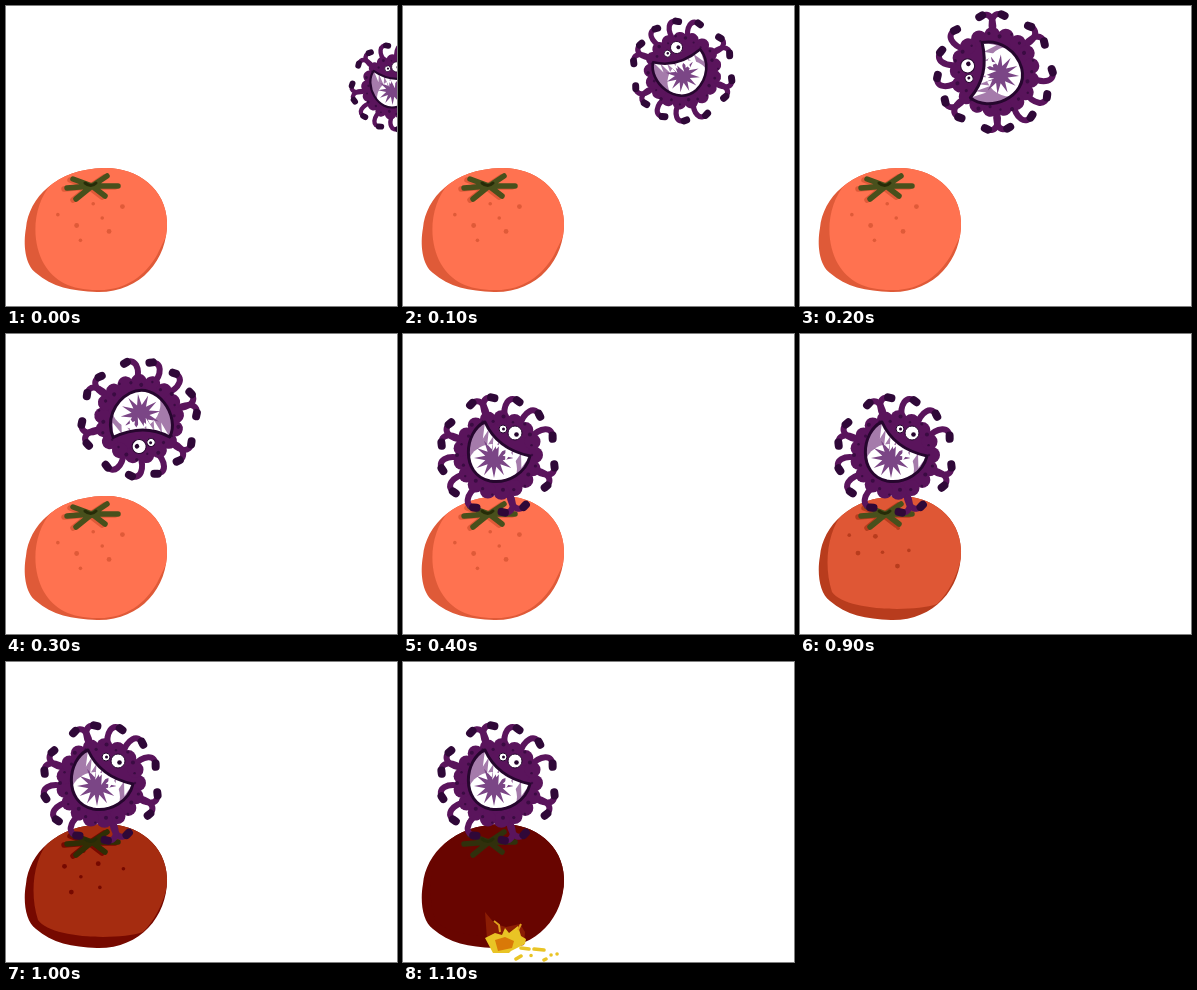
These frames come from a looping animation (391 by 300 pixels, 2.1 s). An HTML page:

```html
<!DOCTYPE html>
<html lang="en">
<head>
<meta charset="utf-8">
<title>Germ and tomato</title>
<style>
html, body { margin: 0; width: 100%; height: 100%; overflow: hidden; background: #fff; }
svg { display: block; width: 100vw; height: 100vh; }
#tomato { fill: var(--shade); stroke-linecap: round; }
#flesh { fill: var(--flesh); }
#stem { stroke: var(--stem); }
#stemShade { stroke: var(--shade); }
</style>
</head>
<body>
<svg viewBox="0 0 391 300">
  <defs>
    <path id="skin" d="M98 162C130 161 160 182 161 216C162 254 134 287 91 286C66 285 46 281 30 267C19 259 17 238 20 222C23 192 50 163 98 162Z"/>
    <path id="star" d="M61 182L86 180 67 173M101 170L86 180 112 180M99 190L86 180 70 193" fill="none" stroke-width="5.500"/>
    <path id="mouth" d="M-13-33C-34-24-38 20-8 26C10 29 28 18 32 1Q-1-6-13-33Z"/>
    <clipPath id="inSkin"><use href="#skin"/></clipPath>
    <clipPath id="inMouth"><use href="#mouth"/></clipPath>
  </defs>

  <g id="tomato">
    <use href="#skin"/>
    <path id="flesh" clip-path="url(#inSkin)"/>
    <use id="stemShade" href="#star" x="-3" y="1"/>
    <g id="pores"></g>
    <use id="stem" href="#star"/>
    <path d="M79 177Q85 182 90 177" fill="none" stroke="#262c08" stroke-width="3"/>
  </g>

  <g id="splat">
    <path d="M82 250L92 262 103 265 117 262 122 270 121 283 96 289 84 277Z" fill="#8b1d04"/>
    <path d="M82 276L92 271 99 273 102 266 106 271 115 264 118 274 123 277 122 282 108 289 106 291 90 291Z" fill="#e9c425"/>
    <path d="M92 278L102 275 111 279 109 286 95 289Z" fill="#d97908"/>
    <path d="M91 259L96 263 97 270M118 262L115 268" fill="none" stroke="#e0a01c" stroke-width="2"/>
    <path d="M118 286L126 287M131 287L141 288M113 297L118 294M128 293.500h.1M141 298L143 297M148 293h.1M154 292h.1" stroke="#e9c425" stroke-width="3.500" stroke-linecap="round"/>
  </g>

  <g id="germ">
    <g id="limbs" fill="none" stroke-linecap="round"></g>
    <g id="body" fill="#5a145c"><circle r="40"/></g>
    <g id="spots" fill="#3a0b42"></g>
    <g clip-path="url(#inMouth)">
      <use href="#mouth" fill="#a57bab"/>
      <circle cx="-6" cy="14" r="25" fill="#fff"/>
      <path id="throat" fill="#7b4686"/>
      <path id="teeth" fill="#fff"/>
    </g>
    <use href="#mouth" fill="none" stroke="#26062e" stroke-width="3" stroke-linejoin="round"/>
    <g fill="#fff" stroke="#26062e">
      <circle cx="5" cy="-26" r="4"/>
      <circle cx="17" cy="-22" r="7"/>
    </g>
    <g fill="#26062e">
      <circle cx="5.500" cy="-26" r="1.500"/>
      <circle cx="18.500" cy="-20.500" r="2.300"/>
    </g>
  </g>
</svg>
<script>
const $ = id => document.getElementById(id);
const repeat = (n, make) => Array.from({ length: n }, (_, i) => make(i));
const polar = (turns, r) => [Math.cos(turns * 2 * Math.PI) * r, Math.sin(turns * 2 * Math.PI) * r];
const dot = ([x, y], r) => `<circle cx="${x}" cy="${y}" r="${r}"/>`;
const curve = (a, b, c, p) => a * (1 - p) ** 2 + 2 * b * p * (1 - p) + c * p * p;

// Limbs stand evenly around the body, from the top clockwise; each curls one way
function limb(sign, i) {
  const angle = i / 14 - .26, curl = sign === '+' ? .03 : -.03;
  const tip = polar(angle, 57), bend = polar(angle - curl * 1.1, 63);
  return `<path d="M${polar(angle - curl, 36)}C${polar(angle - curl * 1.6, 50)} ${bend} ${tip}" stroke="#5a145c" stroke-width="6"/>
    <path d="M${polar(angle - curl * .3, 58)}L${tip}" stroke="#2f0838" stroke-width="8"/>`;
}
$('limbs').innerHTML = [...'++++-+-+----+-'].map(limb).join('');
$('body').innerHTML += repeat(17, i => dot(polar(i / 17, 37), 8)).join('');
$('spots').innerHTML = repeat(22, i => dot(polar(i / 22, 34 + i * 5 % 8), 1.2 + i % 3 * .4)).join('');

// A spiky throat, and teeth hanging from the upper lip
$('throat').setAttribute('d', 'M' + repeat(24, i => {
  const [x, y] = polar(i / 24, i % 2 ? 9 : 20);
  return [x - 4, y + 3];
}).join('L') + 'Z');
$('teeth').setAttribute('d', repeat(7, i => {
  const lip = p => [curve(-13, -1, 32, p), curve(-33, -6, 1, p)];
  const [x, y] = lip((i + .5) / 7);
  return `M${lip(i / 7)}L${x - 4} ${y + 13}L${lip((i + 1) / 7)}Z`;
}).join(''));

const freshEdge = 'M46 177C26 200 25 235 38 258C48 275 65 284 91 284C119 285 139 270 151 249L170 210V150H60Z';
const rottenEdge = 'M43 179C28 196 23 230 32 258C44 276 110 279 137 270Q154 253 161 225L170 150H60Z';
const stages = [
  { from: 0, flesh: '#ff7250', shade: '#df5a38', stem: '#48501c', edge: freshEdge, pores: 7 },
  { from: 900, flesh: '#df5735', shade: '#b83c1d', stem: '#48501c', edge: rottenEdge, pores: 7 },
  { from: 1000, flesh: '#a52c10', shade: '#760900', stem: '#302e05', edge: rottenEdge, pores: 7 },
  { from: 1100, flesh: '#680500', shade: '#680500', stem: '#30300c', edge: rottenEdge, pores: 0 }
];

function paintTomato(stage) {
  for (const part of ['flesh', 'shade', 'stem']) $('tomato').style.setProperty('--' + part, stage[part]);
  $('flesh').setAttribute('d', stage.edge);
  $('pores').innerHTML = repeat(stage.pores, i => {
    const [x, y] = polar(i * .382 + stage.from / 700, Math.sqrt((i + .5) / 7));
    return dot([85 + x * 42, 212 + y * 24], 1.8 + i % 2 * .6);
  }).join('');
}

let shown;
function draw() {
  const t = performance.now() % 2100;
  // The germ tumbles in by hard steps of 100 ms
  const p = Math.min(4, Math.floor(t / 100)) / 4;
  const x = curve(388, 148, 95, p), y = curve(81, 31, 121, p);
  const turn = curve(-30, -35, -360, p), size = Math.min(1, .73 + .54 * p);
  $('germ').setAttribute('transform', `translate(${x} ${y}) rotate(${turn}) scale(${size})`);

  const stage = stages.findLast(s => s.from <= t);
  if (stage !== shown) paintTomato(shown = stage);
  $('splat').style.display = t < 1100 ? 'none' : '';
  requestAnimationFrame(draw);
}
draw();
</script>
</body>
</html>
```
